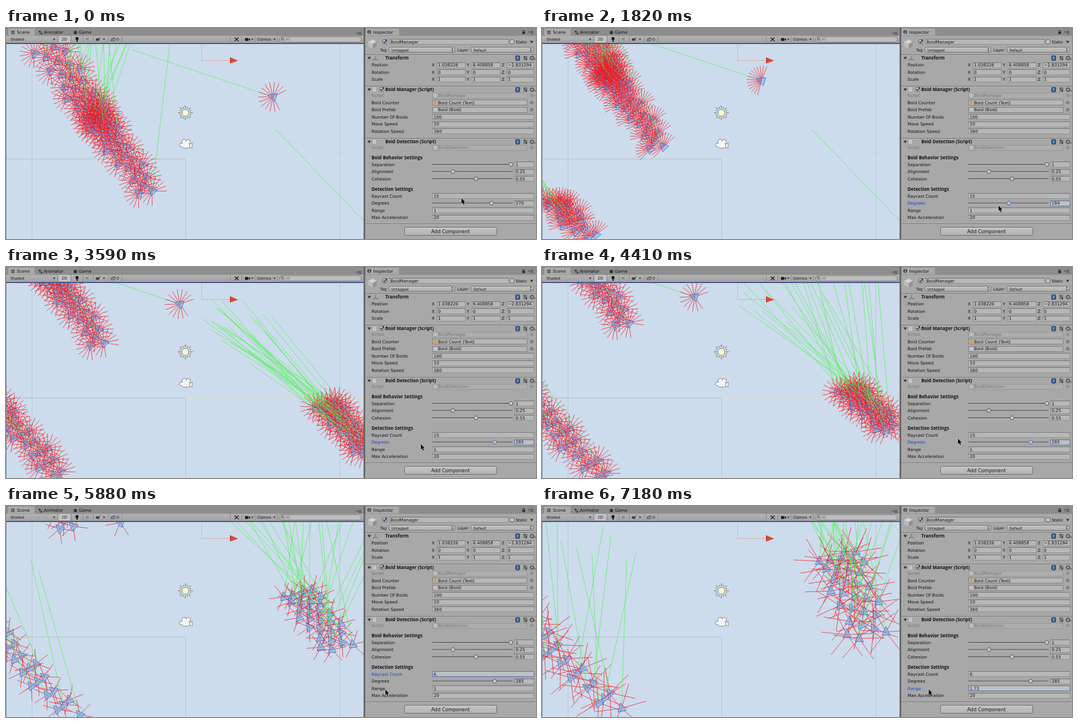
An HTML page with a canvas for the animation above (8.18 s loop, 925 by 368 pixels).

```html
<!DOCTYPE html>
<html lang="en">
<head>
<meta charset="utf-8">
<title>Boid inspector</title>
<style>
html, body { margin: 0; width: 100%; height: 100%; overflow: hidden; background: #a8a8a8; }
canvas { display: block; }
</style>
</head>
<body>
<canvas id="stage" width="925" height="368"></canvas>
<script>
const c = document.getElementById('stage').getContext('2d');
const LOOP = 8180, END = 7180, STEP = 58.6, UNIT = 26, ROW = 12.5;
const INK = '#141414', BLUE = '#1d45c9';

// Keys are [time, value, value...] rows, joined by straight lines.
function track(keys, t) {
  const i = keys.findIndex(k => k[0] > t);
  if (i === 0) return keys[0].slice(1);
  if (i < 0) return keys[keys.length - 1].slice(1);
  const a = keys[i - 1], b = keys[i], k = (t - a[0]) / (b[0] - a[0]);
  return a.slice(1).map((v, j) => v + (b[j + 1] - v) * k);
}

const DEGREES = [[1050, 270], [1816, 184], [2250, 95], [3250, 285]];
const RAYS = [[4700, 15], [5215, 6]];
const RANGE = [[5950, 1], [6446, 3.69], [7180, 1.73]];
const MOUSE = [[0, 795, 297], [350, 815, 314], [645, 853, 308], [1816, 797, 310], [2250, 765, 311],
  [3250, 853, 306], [3570, 724, 309], [5215, 728, 290], [5900, 658, 322], [6446, 718, 324], [7180, 675, 320]];
const FOCUS = [[5900, 'Range'], [4560, 'Raycast Count'], [1000, 'Degrees'], [350, 'Range']];

let seed = 29;
function rnd() {
  seed = (seed * 1664525 + 1013904223) % 4294967296;
  return seed / 4294967296;
}
const signed = () => rnd() * 2 - 1;

// u runs along the flock, side evenly across it.
function flock(n) {
  return Array.from({ length: n }, (_, i) => ({
    u: i / (n - 1), side: (i * .618034 % 1) * 2 - 1, turn: signed() * .4, lean: signed(), pick: rnd()
  }));
}
const leavers = flock(62), risers = flock(46), comers = flock(30);

function line(x1, y1, x2, y2, color, width = 1) {
  c.strokeStyle = color;
  c.lineWidth = width;
  c.beginPath();
  c.moveTo(x1, y1);
  c.lineTo(x2, y2);
  c.stroke();
}
function poly(points, fill, stroke) {
  c.beginPath();
  points.forEach(p => c.lineTo(p[0], p[1]));
  c.closePath();
  if (fill) { c.fillStyle = fill; c.fill(); }
  if (stroke) { c.strokeStyle = stroke; c.lineWidth = 1; c.stroke(); }
}
function rect(x, y, w, h, fill) {
  c.fillStyle = fill;
  c.fillRect(x, y, w, h);
}
function frame(x, y, w, h, color) {
  c.strokeStyle = color;
  c.lineWidth = 1;
  c.strokeRect(x + .5, y + .5, w - 1, h - 1);
}
function disc(x, y, r, fill, stroke) {
  c.beginPath();
  c.arc(x, y, r, 0, 7);
  if (fill) { c.fillStyle = fill; c.fill(); }
  if (stroke) { c.strokeStyle = stroke; c.lineWidth = 1; c.stroke(); }
}
function round(x, y, w, h, r, fill, stroke) {
  c.beginPath();
  c.roundRect(x, y, w, h, r);
  c.fillStyle = fill;
  c.fill();
  c.strokeStyle = stroke;
  c.lineWidth = 1;
  c.stroke();
}
function fade(y1, y2, a, b) {
  const g = c.createLinearGradient(0, y1, 0, y2);
  g.addColorStop(0, a);
  g.addColorStop(1, b);
  return g;
}
function text(s, x, y, color = INK, size = 7.4) {
  c.font = size + 'px "DejaVu Sans", sans-serif';
  c.fillStyle = color;
  c.fillText(s, x, y + 2.8);
}
function bold(s, x, y) {
  c.font = 'bold 7.9px "Open Sans", sans-serif';
  c.fillStyle = INK;
  c.fillText(s, x, y + 2.8);
}
const down = (x, y, s = 2.5) => poly([[x - s, y - s / 2], [x + s, y - s / 2], [x, y + s]], '#333');

function drawBoid(x, y, head, env, green) {
  if (x < -30 || x > 660 || y < 10 || y > 400) return;
  const at = (r, a) => [x + r * Math.cos(head + a), y + r * Math.sin(head + a)];
  if (green) line(x, y, x + 260 * Math.cos(green), y + 260 * Math.sin(green), 'rgba(70,245,70,.8)', .9);
  c.strokeStyle = 'rgba(246,18,24,.82)';
  c.lineWidth = .9;
  c.beginPath();
  for (let i = 0; i < env.rays; i++) {
    c.moveTo(x, y);
    c.lineTo(...at(env.reach, (i / (env.rays - 1) - .5) * env.arc));
  }
  c.stroke();
  poly([at(9.5, 0), at(9, 2.2), at(9, -2.2)], 'rgba(120,190,240,.6)', 'rgba(55,95,210,.8)');
}

// Leaves through the top left, moving as one band.
function drawLeavers(t, env) {
  const lean = -1.4 - .7 * Math.min(1, t / 2500);
  for (const b of leavers) {
    const y = 30 + 258 * (b.u + .1 * Math.sin(2 * Math.PI * b.u));
    const across = b.side * (24 - 9 * b.u);
    const x = 60 + .68 * (y - 10) + across;
    drawBoid(x - t * .0235, y - across * .6 - t * .0425, -2.1 + b.turn, env, b.pick < .4 && lean + b.lean * .3);
  }
  drawBoid(466 - t * .0455, 120 - t * .0155, -2.82, env, t < 6400 && -2.82);
}

// Enters one by one over the bottom edge.
function drawRisers(t, env) {
  const [lean] = track([[5200, -2.15], [7180, -1.55]], t);
  for (const b of risers) {
    const age = t - 250 - 6570 * b.u ** 1.5;
    if (age < -60) continue;
    const x = 72 + 62 * b.u * b.u + b.side * 25;
    drawBoid(x - age * .03, 368 - age * .042, -2.15 + b.turn, env, b.pick < .45 && lean + b.lean * .25);
  }
}

// Enters from the right and stretches out while turning upward: x, y, axis, width.
function drawComers(t, env) {
  const [x, y, ax, ay, w] = track([[1816, 710, 400, 75, 90, 22], [3575, 597, 281, 75, 90, 20],
    [5215, 550, 214, 75, 62, 22], [6446, 545, 186, 65, 140, 32], [7180, 545, 157, 50, 150, 36]], t);
  const [lean, fan, head] = track([[3575, -2.42, .18, -2.3], [5215, -1.75, .75, -2.1], [7180, -1.75, .55, -1.85]], t);
  for (const b of comers) {
    const k = b.u ** 1.3 - .5;
    drawBoid(x + ax * k + w * b.side, y + ay * k - w * b.side * .4, head + b.turn, env, b.pick < .85 && lean + b.lean * fan);
  }
}

function sceneIcons() {
  line(341.5, 28, 341.5, 57, 'rgba(240,150,120,.55)');
  c.setLineDash([2, 1]);
  line(341, 56.5, 391, 56.5, 'rgba(235,120,100,.75)');
  c.setLineDash([]);
  poly([[391, 51], [405, 57], [391, 62]], '#e2452b');
  line(391.5, 51, 391.5, 62, '#a8341f');

  for (let i = 0; i < 16; i++) {
    const a = i * Math.PI / 8, r = i % 2 ? 11 : 13;
    line(313 + 8 * Math.cos(a), 148 + 8 * Math.sin(a), 313 + r * Math.cos(a), 148 + r * Math.sin(a), '#77756a', 1.2);
  }
  disc(313, 148, 6, '#fbf6d2', '#858066');

  const edge = '#83878c', white = '#f6f6f4';
  disc(306, 204, 3.3, white, edge);
  disc(311, 198, 4, white, edge);
  disc(318, 198.5, 4, white, edge);
  round(308.5, 200.5, 12, 9, 2, white, edge);
  poly([[320, 204], [325, 200.5], [325, 209.5], [320, 207]], white, edge);
  rect(308, 198, 11, 10, white);
}

function drawScene(t, env) {
  c.save();
  c.beginPath();
  c.rect(1, 27, 623, 341);
  c.clip();
  rect(0, 27, 625, 341, '#ccdcec');
  const grid = '#b8c4d2';
  line(45.5, 27, 45.5, 368, grid);
  line(582.5, 27, 582.5, 368, grid);
  line(313.5, 229, 313.5, 368, grid);
  line(0, 228.5, 313, 228.5, '#b3bfca');
  line(314, 229.5, 625, 229.5, '#e0dfd2');
  drawLeavers(t, env);
  drawRisers(t, env);
  drawComers(t, env);
  sceneIcons();
  c.restore();
  rect(0, 27, 1, 341, '#7f8ca5');
}

function menuIcon(x, y) {
  down(x - 2.5, y, 1.5);
  for (let i = -1; i < 2; i++) line(x, y + i * 2 + .5, x + 5, y + i * 2 + .5, '#333', .8);
}

function drawToolbar() {
  rect(0, 0, 625, 13, '#8d8d8d');
  rect(4, 1, 46, 12, '#aaaaaa');
  rect(0, 13, 625, 13, fade(13, 26, '#b5b5b5', '#a1a1a1'));
  rect(0, 13, 625, 1, '#9b9b9b');
  rect(0, 26, 624, 2, '#47598c');
  for (const d of [10.5, 13.5]) {
    line(d, 4, d, 11, '#333', .9);
    line(8.5, d - 4.5, 15.5, d - 4.5, '#333', .9);
  }
  text('Scene', 19, 7.5);
  disc(58.5, 6, 1.6, '#333');
  disc(62, 10, 1.6, '#333');
  line(58, 10, 62, 6, '#333');
  text('Animator', 66, 7.5);
  disc(121, 8, 3, '#333');
  text('Game', 127, 7.5);
  menuIcon(615, 9);

  text('Shaded', 8, 19.5, INK, 6.3);
  rect(92, 14, 20, 11, '#c4c4c4');
  text('2D', 97, 19.5, INK, 7);
  for (const x of [90, 113, 134, 152, 178, 202, 391, 411, 434, 473]) line(x + .5, 14, x + .5, 25, '#8c8c8c');
  for (const x of [84, 171, 430, 468.5]) down(x, 19.5, 2);
  disc(124, 18.5, 2.7, '#111');
  rect(123, 20, 2, 4, '#111');
  poly([[139, 18], [141, 18], [144, 16], [144, 23], [141, 21], [139, 21]], '#888');
  rect(157, 18, 6, 4, '#444');
  line(159, 23, 165, 16, '#444');
  c.beginPath();
  c.ellipse(187, 20, 4, 2.3, 0, 0, 7);
  c.stroke();
  line(183, 23, 190, 16, '#444');
  text('0', 193, 19.5, INK, 6.5);
  line(399, 16.5, 406, 23, '#222', 1.5);
  line(406, 16.5, 399, 23, '#222', 1.5);
  rect(417, 17.5, 6, 5, '#222');
  poly([[423, 20], [426, 17.5], [426, 22.5]], '#222');
  text('Gizmos', 438, 19.5, INK, 6.7);
  round(477.5, 15, 143, 9.5, 4.7, '#bdbdbd', '#777');
  disc(482.5, 19, 2, null, '#444');
  line(484, 20.5, 486, 22.5, '#444');
  text('All', 488, 19.5, '#707070', 6.3);
}

function field(x, y, w, focused) {
  const top = Math.round(y - 5);
  rect(x, top, w, 10, focused ? '#c0c0c0' : '#b7b7b7');
  frame(x, top, w, 10, focused ? '#4e6fb8' : '#909090');
  if (!focused) rect(x, top, w, 1, '#727272');
}
function row(name, y, value, env, x = 744) {
  const on = env.focus === name;
  text(name, 638, y, on ? BLUE : INK);
  field(x, y, 922 - x, on);
  text(value, x + 2.5, y);
}
function slider(name, y, knob, value, env) {
  row(name, y, value, env, 887);
  rect(744, y - 1, 140, 2, '#6f6f6f');
  rect(744, y + 1, 140, 1, '#bcbcbc');
  const on = env.focus === name;
  disc(knob, y, 3.4, on ? '#b4c4dc' : '#c9c9c9', on ? '#4668ad' : '#555');
}
function slot(name, y, value, icon, off) {
  const ink = off ? '#747474' : INK;
  text(name, 638, y, ink);
  rect(744, Math.round(y - 5), 166, 10, off ? '#adadad' : '#b7b7b7');
  frame(744, Math.round(y - 5), 166, 10, off ? '#989898' : '#808080');
  rect(747, y - 2.5, 4.5, 5, icon);
  text(value, 754, y, ink);
  disc(917.5, y, 2.3, null, off ? '#858585' : '#555');
  disc(917.5, y, .7, '#555');
}
function check(x, y, on) {
  round(x - 3.5, y - 3.5, 7, 7, 1, '#c8c8c8', '#5c5c5c');
  if (!on) return;
  line(x - 2, y, x - .5, y + 2, '#142a66', 1.4);
  line(x - .5, y + 2, x + 3.5, y - 4, '#142a66', 1.4);
}
function divider(y) {
  rect(627, y, 298, 1, '#777');
  rect(627, y + 1, 298, 1, '#b8b8b8');
}
function header(name, y, script) {
  divider(y - 6.5);
  down(634, y - .5, 3);
  bold(name, 662, y);
  if (script) rect(640, y - 3.5, 6, 7, '#c2c5c7');
  round(889.5, y - 4, 7, 8, 1, '#40659c', '#26364f');
  text('?', 891.3, y, '#eee', 6);
  for (let i = -1; i < 2; i++) line(903, y + i * 2.5, 910, y + i * 2.5, '#333', .9);
  line(905, y - 4, 905, y - 1, '#222', 1.2);
  line(908, y, 908, y + 4, '#222', 1.2);
  disc(918, y, 2.6, null, '#333');
  for (let i = 0; i < 8; i++) {
    const a = i * Math.PI / 4;
    disc(918 + 3.7 * Math.cos(a), y + 3.7 * Math.sin(a), .7, '#333');
  }
  down(923, y + 2, 1.3);
}
function popup(x, w, s) {
  round(x + .5, 33.5, w, 9, 2, fade(33, 43, '#c4c4c4', '#adadad'), '#777');
  text(s, x + 4.5, 37.8, INK, 6.2);
  const r = x + w - 4;
  poly([[r - 1.7, 37], [r + 1.7, 37], [r, 34.8]], '#333');
  poly([[r - 1.7, 39], [r + 1.7, 39], [r, 41.2]], '#333');
}

function drawObject() {
  poly([[632, 24], [640, 20.5], [647, 24], [640, 28]], '#d3d3d3');
  poly([[632, 24], [640, 28], [640, 36], [632, 32]], '#bcbcbc');
  poly([[647, 24], [640, 28], [640, 36], [647, 32]], '#929292');
  check(661, 24, true);
  field(669, 24, 208);
  text('BoidManager', 671, 24);
  check(883, 24, false);
  text('Static', 889.5, 24, INK, 7);
  down(917.5, 24, 2.8);
  text('Tag', 653, 38, INK, 6.7);
  popup(668, 115, 'Untagged');
  text('Layer', 788, 38, INK, 6.7);
  popup(811, 109, 'Default');

  header('Transform', 52.5);
  line(645, 48, 645, 54, '#5d7d48');
  line(645, 54, 650, 56, '#a04b3b');
  line(645, 54, 640, 56, '#42609b');
  const place = { Position: ['1.038226', '6.408858', '−2.831294'], Rotation: [0, 0, 0], Scale: [1, 1, 1] };
  Object.keys(place).forEach((name, r) => {
    const y = 64.5 + r * ROW;
    text(name, 638, y);
    place[name].forEach((v, i) => {
      const x = 743 + i * 61;
      text('XYZ'[i], x, y);
      field(x + 9, y, i < 2 ? 50 : 48);
      text(v, x + 11, y);
    });
  });
}

function drawInspector(env) {
  rect(624, 0, 301, 368, '#a8a8a8');
  rect(624, 0, 301, 13, '#8d8d8d');
  rect(628, 1, 58, 12, '#a8a8a8');
  rect(624, 0, 3, 368, '#696969');
  rect(627, 13, 298, 1, '#979797');
  disc(634, 7, 3.3, '#3f4650');
  rect(633.5, 6.5, 1, 3, '#eee');
  rect(633.5, 4.8, 1, 1, '#eee');
  text('Inspector', 641, 7);
  rect(901, 6.5, 5, 4, '#333');
  disc(903.5, 5.7, 1.7, null, '#333');
  menuIcon(915, 7);
  drawObject();

  let y = 117.5;
  const next = () => y += ROW;
  header('Boid Manager (Script)', y - 10, true);
  check(656, y - 10.5, true);
  slot('Script', y, 'BoidManager', '#bfc3c7', true);
  slot('Boid Counter', next(), 'Boid Count (Text)', '#d99a3c');
  slot('Boid Prefab', next(), 'Boid (Boid)', '#c5c8cc');
  row('Number Of Boids', next(), '100', env);
  row('Move Speed', next(), '10', env);
  row('Rotation Speed', next(), '360', env);

  header('Boid Detection (Script)', 198.5, true);
  slot('Script', 208.5, 'BoidDetection', '#bfc3c7', true);
  y = 238;
  bold('Boid Behavior Settings', 638, y - 11.5);
  slider('Separation', y, 881, '1', env);
  slider('Alignment', next(), 780, '0.25', env);
  slider('Cohesion', next(), 820.5, '0.55', env);
  y = 293;
  bold('Detection Settings', 638, y - 12);
  row('Raycast Count', y, env.rays, env);
  slider('Degrees', next(), 745.8 + env.degrees * .376, env.degrees, env);
  row('Range', next(), +env.range.toFixed(2), env);
  row('Max Acceleration', next(), '20', env);
  divider(341);
  round(695.5, 347.5, 161, 14, 2.5, fade(347, 362, '#c6c6c6', '#b2b2b2'), '#6d6d6d');
  text('Add Component', 742, 354.8, INK, 8.4);
}

function drawMouse(t) {
  const [x, y] = track(MOUSE, t);
  if (t > 250 && t < 740) {
    line(x, y - 5, x, y + 5, '#222');
    line(x - 2, y - 5, x + 2, y - 5, '#222');
    line(x - 2, y + 5, x + 2, y + 5, '#222');
    return;
  }
  const tip = [[0, 0], [0, 9], [2, 7.4], [3.6, 11], [5.2, 10.2], [3.7, 6.8], [6.4, 6.5]].map(p => [x + p[0], y + p[1]]);
  poly(tip, null, 'rgba(235,235,235,.75)');
  poly(tip, '#000');
}

function draw(now) {
  const ms = now % LOOP;
  const t = ms >= END ? END : Math.floor(ms / STEP) * STEP;
  const degrees = Math.round(track(DEGREES, t)[0]);
  const range = track(RANGE, t)[0];
  const focus = FOCUS.find(f => t >= f[0]);
  const env = {
    degrees, range,
    arc: degrees * Math.PI / 180,
    reach: range * UNIT,
    rays: Math.round(track(RAYS, t)[0]),
    focus: focus ? focus[1] : ''
  };
  drawScene(t, env);
  drawToolbar();
  drawInspector(env);
  drawMouse(t);
}

const start = performance.now();
function loop() {
  draw(performance.now() - start);
  requestAnimationFrame(loop);
}
loop();
</script>
</body>
</html>
```
